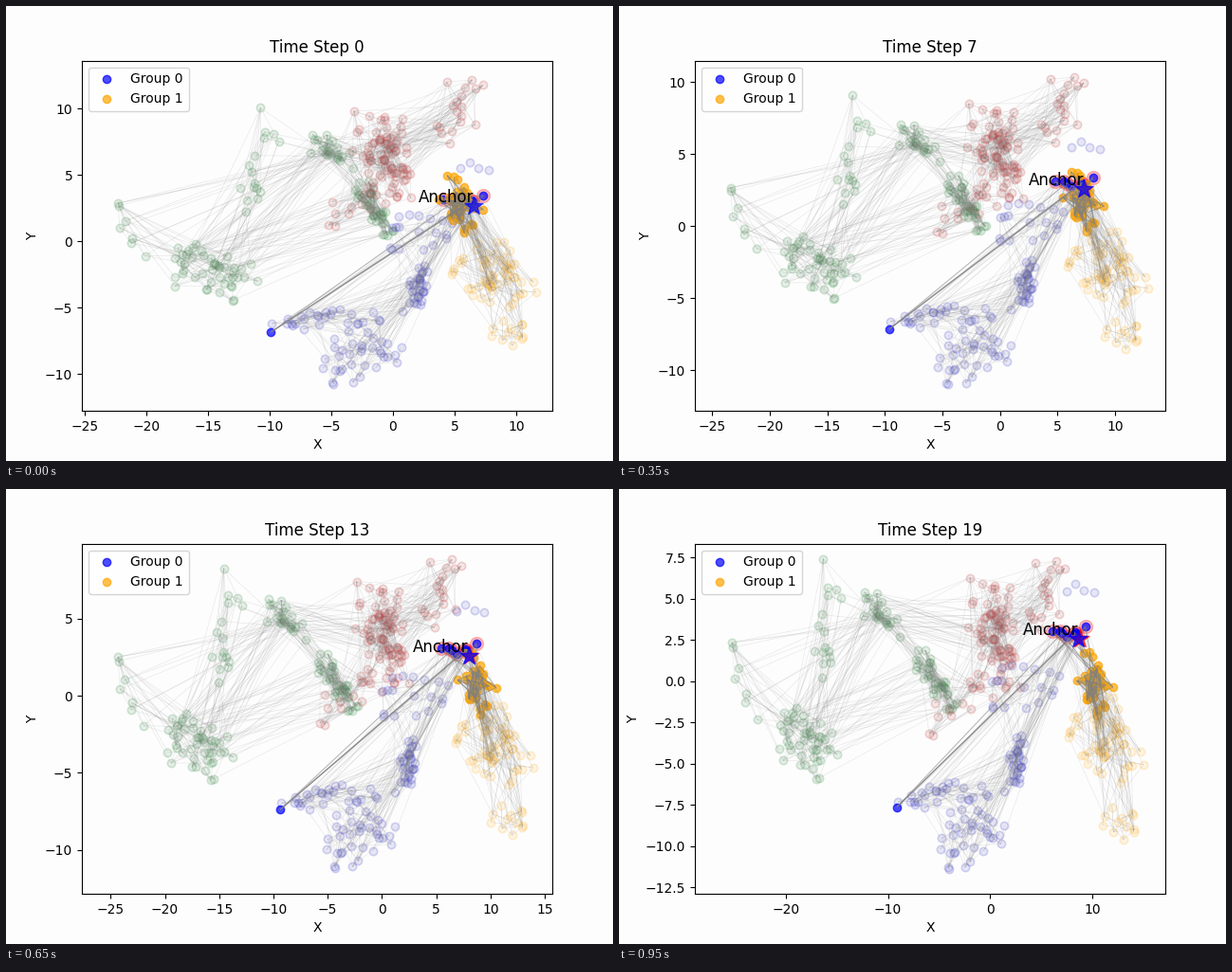
Recreate the animation shown at these times as a matplotlib script. Size 640x480 px, loop 1000 ms.

```python
import numpy as np
import matplotlib.pyplot as plt
from matplotlib.animation import FuncAnimation
from matplotlib.collections import LineCollection
from matplotlib.colors import to_rgba

STEPS = 20
BACK = "#fdfdfd"
RED, GREEN, BLUE = "#b81c1c", "#1a7a2a", "#2020c0"
rng = np.random.default_rng(12)


class Strip:
    """Random points strewn along a segment that glides to another segment."""

    def __init__(self, color, count, jitter, start, end):
        along = rng.permutation(np.linspace(0, 1, count))[:, None]
        noise = jitter * np.clip(rng.normal(size=(count, 2)), -1.8, 1.8)
        self.color = color
        self.start, self.end = (
            np.array(a) + along * np.subtract(b, a) + noise for a, b in (start, end))

    def at(self, u):
        return self.start + u * (self.end - self.start)


def dot(start, end):
    return Strip("blue", 1, 0, (start, start), (end, end))


faded = {
    "west": Strip(GREEN, 7, .4, [(-23, 2.5), (-20.3, -.4)], [(-26, 2), (-23, -1.6)]),
    "plain": Strip(GREEN, 46, 1, [(-17.4, -1.6), (-12, -3)], [(-20, -3), (-16, -4.4)]),
    "ridge": Strip(GREEN, 16, .8, [(-12.2, 2), (-9.4, 8.6)], [(-16.7, 0), (-15, 6)]),
    "knot": Strip(GREEN, 22, .5, [(-6.4, 7.6), (-4, 6.1)], [(-12.2, 5), (-9.6, 3.3)]),
    "chain": Strip(GREEN, 36, .45, [(-2.6, 4), (-.5, .6)], [(-7, 1.4), (-3.8, -1.5)]),
    "wing": Strip(RED, 18, .8, [(4.4, 8.2), (6, 11.6)], [(4.7, 3.9), (6, 6.7)]),
    "crown": Strip(RED, 75, 1.1, [(-1.6, 8), (.3, 5.2)], [(-.4, 4.5), (1.3, 1.6)]),
    "skirt": Strip(RED, 20, .7, [(-4.6, 2.4), (.5, 3.9)], [(-5.5, -2), (2, .3)]),
    "shore": Strip(BLUE, 28, .5, [(-9, -5.9), (-1.5, -6.1)], [(-8.2, -7), (-.7, -7)]),
    "delta": Strip(BLUE, 32, 1, [(-5, -9.2), (.2, -8.2)], [(-4.2, -9.8), (.9, -9)]),
    "stem": Strip(BLUE, 30, .45, [(1.4, -4.9), (2.6, -2)], [(2, -6.3), (3.1, -3.4)]),
    "arc": Strip(BLUE, 18, .8, [(-.7, .6), (5, .4)], [(-.5, -.4), (7, -.6)]),
    "cap": Strip(BLUE, 4, .3, [(5.6, 5.6), (7.4, 4.9)], [(7.6, 5.6), (9.8, 5)]),
    "fan": Strip(ORANGE := "orange", 58, 1.2, [(6.2, -1.2), (9.6, -3.8)],
                 [(9, -2), (13, -5)]),
    "toes": Strip(ORANGE, 12, .5, [(8.6, -6.4), (10.6, -7.4)], [(11.6, -8), (14.2, -9.2)]),
}
vivid = {
    "core": Strip(ORANGE, 36, .75, [(4.9, 4.1), (6.2, 1.7)], [(9.7, .9), (10.9, -.9)]),
    "ring": Strip("blue", 8, .4, [(4.8, 2.4), (6.6, 3.2)], [(6.8, 2.3), (8.6, 3.1)]),
    "outlier": dot((-9.9, -6.86), (-9.13, -7.62)),
    "anchor": dot((6.54, 2.64), (8.64, 2.57)),
}
clusters = faded | vivid

# Each chain of names links every cluster to itself and to its neighbours.
WEAK_CHAINS = ["west plain ridge knot chain plain knot west",
               "knot crown wing crown skirt chain",
               "shore delta stem arc ring stem shore ring delta",
               "toes fan core fan ring"]
STRONG = [("core", "core", 60), ("core", "ring", 8), ("outlier", "ring", 4)]


def weak_links():
    links = []
    for names in map(str.split, WEAK_CHAINS):
        sizes = {name: len(clusters[name].start) for name in names}
        links += [(a, a, int(1.5 * n)) for a, n in sizes.items() if a in faded]
        links += [(a, b, sizes[a] * 2 // 5 + sizes[b] * 2 // 5)
                  for a, b in zip(names, names[1:])]
    return links


def pick_edges(links):
    return [(a, b, rng.integers(len(clusters[a].start), size=n),
             rng.integers(len(clusters[b].start), size=n)) for a, b, n in links]


weak_edges, strong_edges = pick_edges(weak_links()), pick_edges(STRONG)

fig, ax = plt.subplots(figsize=(6.4, 4.8), dpi=100, facecolor=BACK)


def draw_edges(edges, pos, **style):
    segments = [np.stack([pos[a][i], pos[b][j]], axis=1) for a, b, i, j in edges]
    ax.add_collection(LineCollection(np.concatenate(segments), colors="gray",
                                     zorder=2, **style), autolim=False)


def set_view(step):
    """Pixels per unit and the pixel of each zero drift almost evenly."""
    bow = step * (STEPS - 1 - step)
    sx, zero_x = 13 - .1175 * step - .0004 * bow, 408 - .879 * step - .002 * bow
    sy, zero_y = 14 + .179 * step - .0006 * bow, 248 - 2.37 * step + .011 * bow
    ax.set_xlim((80 - zero_x) / sx, (576 - zero_x) / sx)
    ax.set_ylim((zero_y - 427.2) / sy, (zero_y - 57.6) / sy)


def update(step):
    ax.clear()
    ax.set_facecolor(BACK)
    u = step / (STEPS - 1)
    pos = {name: c.at(u) for name, c in clusters.items()}

    for name, cluster in faded.items():
        ax.scatter(*pos[name].T, facecolors=[to_rgba(cluster.color, .1)],
                   edgecolors=[to_rgba(cluster.color, .18)], linewidths=1.2)
    ax.scatter(*pos["ring"].T, s=100, color="red", alpha=.25)
    group0 = np.vstack([pos["ring"], pos["outlier"]])
    ax.scatter(*group0.T, color="blue", alpha=.7, label="Group 0")
    ax.scatter(*pos["core"].T, color="orange", alpha=.7, label="Group 1")

    draw_edges(weak_edges, pos, linewidths=.5, alpha=.16)
    draw_edges(strong_edges, pos, linewidths=.8, alpha=.55)

    x, y = pos["anchor"][0]
    ax.scatter(x + .2 * u, y, s=200, marker="*", color="red", alpha=.7 * u, zorder=3)
    ax.scatter(x, y, s=200, marker="*", color="blue", alpha=.7, zorder=3)
    ax.text(x, y, "Anchor", fontsize=12, ha="right", va="bottom", zorder=4)

    set_view(step)
    ax.set_title(f"Time Step {step}")
    ax.set_xlabel("X")
    ax.set_ylabel("Y")
    ax.legend(loc="upper left")


anim = FuncAnimation(fig, update, frames=STEPS, interval=50, repeat=True,
                     repeat_delay=0, init_func=lambda: None)
plt.show()
```
